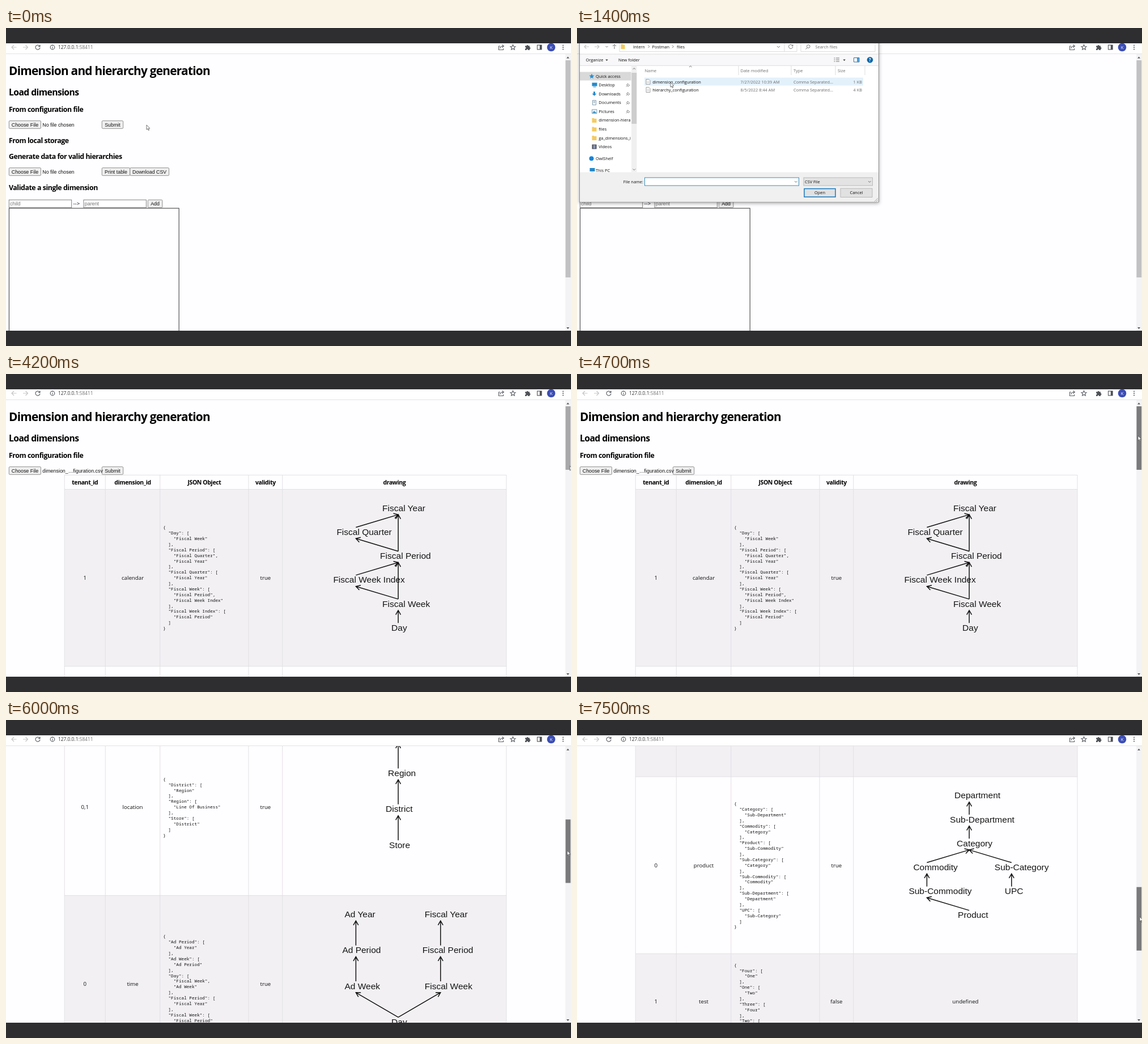
Animation of 997x561 px, one loop 7600 ms. Source, as an HTML page:

```html
<!DOCTYPE html>
<html lang="en">
<head>
<meta charset="utf-8">
<title>Dimension and hierarchy generation</title>
<style>
html, body { margin: 0; width: 100%; height: 100%; overflow: hidden; background: #fefdff; }
svg { display: block; width: 997px; height: 561px; }
text { font-family: "Open Sans", "Noto Sans", sans-serif; fill: #111; }
.h { font-weight: 700; letter-spacing: -.037em; fill: #000; }
.h1 { font-size: 20.9px; }
.h2 { font-size: 15.7px; }
.h3 { font-size: 12.4px; }
.th { font-size: 10.5px; }
.b { font: 8.89px "Liberation Sans", Arial, sans-serif; }
.hint { fill: #757575; }
.td { font-size: 9.7px; }
.m { font: 7.68px "Noto Sans Mono", "DejaVu Sans Mono", monospace; }
.n { font: 15.5px "Liberation Sans", Arial, sans-serif; fill: #151515; }
.d { font-size: 7.4px; }
.dim { fill: #6d6d6d; }
.mid { text-anchor: middle; }
.end { text-anchor: end; }
.btn { fill: #efefef; stroke: #767676; stroke-width: .8; }
.field { fill: #fff; stroke: #767676; stroke-width: .9; }
.ln { fill: none; stroke: #5f6368; stroke-width: 1.2; }
.pale { stroke: #c4c5c8; }
.edge { fill: none; stroke: #111; stroke-width: 1.5; }
.grid { fill: none; stroke: #dfdee1; stroke-width: .9; }
.thin { fill: none; stroke: #666; stroke-width: .9; }
</style>
</head>
<body>
<svg viewBox="0 0 997 561">
  <defs>
    <clipPath id="view"><rect y="46" width="987" height="488"/></clipPath>
    <clipPath id="stage"><rect y="27" width="997" height="507"/></clipPath>
    <clipPath id="nav"><rect x="5" y="66" width="90.5" height="188.5"/></clipPath>
    <filter id="shade" x="-5%" y="-5%" width="110%" height="112%">
      <feDropShadow dx="0" dy="2" stdDeviation="3" flood-opacity=".35"/>
    </filter>
  </defs>
  <rect width="997" height="561" fill="#fefdff"/>

  <g clip-path="url(#view)"><g id="page">
    <text class="h h1" x="5" y="82.8">Dimension and hierarchy generation</text>
    <text class="h h2" x="5" y="118.6">Load dimensions</text>
    <text class="h h3" x="5" y="148.3">From configuration file</text>
    <g id="pick"></g>
    <g id="send"></g>
    <text class="b" id="file" x="64.3" y="173.7"></text>
    <g id="below"></g>
    <g id="table"></g>
    <path id="spin" d="M-.3-6.8A6.8 6.8 0 0 1-2 6.5" fill="none" stroke="#111" stroke-width="1.9"/>
  </g></g>

  <rect x="987" y="46" width="10" height="488" fill="#f3f2f4"/>
  <rect id="thumb" x="987.4" width="8.8"/>
  <path d="M989 53.5l2.5-3 2.5 3zM989 528l2.5 3 2.5-3z" fill="#555"/>

  <g id="bar">
    <rect y="27" width="997" height="18.5" fill="#fff"/>
    <path d="M0 45.5H997" stroke="#e2e1e4"/>
    <path class="ln pale" d="M18.5 34H10M14 30l-4 4 4 4M30 34h8.5M34.5 30l4 4-4 4"/>
    <path class="ln" d="M59.2 31.6A4 4 0 1 0 60 34.6M60 29.6v3h-3"/>
    <circle class="ln" cx="82" cy="34" r="3.8" stroke-width="1"/>
    <path class="ln" d="M82 33.4v2.8M82 31.6v1"/>
    <text x="92" y="37.2" font-size="8.4" style="fill:#333">127.0.0.1<tspan fill="#777">:58411</tspan></text>
    <path class="ln" d="M872 32h-2.5v6.5h8V36M872 36c0-3 2-4 5-4M875.5 29.5l2.8 2.5-2.8 2.5"/>
    <path class="ln" d="M894.5 29.5l1.3 3 3.2.3-2.4 2.1.7 3.2-2.8-1.7-2.8 1.7.7-3.2-2.4-2.1 3.2-.3z"/>
    <path fill="#4d5156" d="M916 31.5h2.6a1.5 1.5 0 1 1 3 0h2.4v2.4a1.5 1.5 0 1 1 0 3v2h-2.6a1.4 1.4 0 0 0-2.8 0H916v-2.4a1.5 1.5 0 0 0 0-3z"/>
    <path class="ln" d="M937.5 30.2h7.5v7.6h-7.5z"/>
    <path fill="#4d5156" d="M941.8 30h3.5v8h-3.5z"/>
    <circle cx="962" cy="34" r="7.3" fill="#3c4db3"/>
    <text class="mid" x="962" y="36.8" font-size="7.6" style="fill:#fff">K</text>
    <g fill="#4d5156"><circle cx="983" cy="30.6" r="1"/><circle cx="983" cy="34" r="1"/><circle cx="983" cy="37.4" r="1"/></g>
  </g>

  <g clip-path="url(#stage)"><g id="dialog">
    <rect x="4.5" y="10" width="528" height="297" fill="#fff" stroke="#777" stroke-width=".8" filter="url(#shade)"/>
    <rect x="5" y="46" width="527" height="20" fill="#f8f8fa"/>
    <path class="thin" style="stroke:#d9d9d9" d="M75 27v14.5h291V27M366 41.5h22V27M395 27v14.5h131V27M5 46h527M5 66.3h527M285 67v16M378 67v16M456 67v16M508 67v16"/>
    <path class="ln pale" d="M21 33h-8M16.5 29.5L13 33l3.5 3.5M31 33h8M35.5 29.5L39 33l-3.5 3.5"/>
    <path class="thin" d="M50.5 32l2 2 2-2M66 37v-8M63 32l3-3 3 3M125.5 30.5l2.3 2.3-2.3 2.3M168 30.5l2.3 2.3-2.3 2.3M353 32l2.5 2.5L358 32M380 30.5a3.6 3.6 0 1 0 .8 2.5M381 29v2.5h-2.5M406 35l-2.5 2.5M198 69l2.3-2 2.3 2"/>
    <circle class="thin" cx="408.3" cy="32.5" r="2.8"/>
    <path d="M77.5 28.5h3l1 1h3V37h-7z" fill="#f5cb60"/>
    <g id="labels"></g>
    <path d="M50.3 55.5h4.4L52.5 58zM469.5 55.5h4.4l-2.2 2.5z" fill="#333"/>
    <path class="thin" d="M453.5 53h2M457 53h6M453.5 56h2M457 56h6M453.5 59h2M457 59h6"/>
    <path d="M488.5 52.5h9.5V60h-9.5z" fill="#fff" stroke="#3c6f94"/>
    <path d="M494 53h4v7h-4z" fill="#4b9cd3"/>
    <circle cx="517" cy="56.3" r="5.3" fill="#0d67a8"/>
    <text class="mid" x="517" y="59.2" font-size="8" font-weight="700" style="fill:#fff">?</text>

    <rect x="5" y="77.5" width="90.5" height="15" fill="#d9d9d9"/>
    <g id="tree" clip-path="url(#nav)"></g>
    <rect x="96" y="66.5" width="9.5" height="188" fill="#f0f0f0"/>
    <rect x="96.3" y="79" width="8.9" height="90" fill="#cdcdcd"/>
    <path class="thin" d="M98.5 73l2.3-2.3 2.3 2.3M98.5 248.5l2.3 2.3 2.3-2.3"/>

    <rect id="hot" x="119" y="87.5" width="386" height="14" fill="#e3f1fb"/>
    <g id="files"></g>

    <rect x="5" y="254.5" width="527" height="52" fill="#f0f0f0"/>
    <rect x="119.5" y="264" width="272" height="14" fill="#fff" stroke="#3c8fb8"/>
    <rect x="400" y="264" width="121.5" height="14" fill="#e3e3e3" stroke="#adadad" stroke-width=".8"/>
    <path class="thin" d="M384 270l2.3 2.3 2.3-2.3M514 270l2.3 2.3 2.3-2.3"/>
    <rect x="401" y="283.5" width="55" height="14.5" fill="#e1e1e1" stroke="#1578be" stroke-width="1.5"/>
    <rect x="465" y="283" width="56" height="15.5" fill="#e1e1e1" stroke="#adadad" stroke-width=".8"/>
    <path d="M531 300l-6 6M531 303l-3 3" stroke="#aaa"/>
    <g id="foot"></g>
  </g></g>

  <path id="mouse" d="M0 0V8.3L2 6.6 3.3 9.7 4.6 9.1 3.3 6.1H5.9Z" fill="#fff" stroke="#555" stroke-width=".8"/>
  <path d="M0 0H997V27H0zM0 534H997V561H0z" fill="#2e2d30"/>
</svg>
<script>
(() => {
const $ = id => document.getElementById(id);
const add = (id, html) => $(id).insertAdjacentHTML('beforeend', html);
const text = (x, y, s, cls) => `<text class="${cls}" x="${x}" y="${y}">${s}</text>`;
const box = (x, y, w, cls, r = 0) =>
  `<rect class="${cls}" x="${x}" y="${y}" width="${w}" height="13.6" rx="${r}"/>`;
const button = (x, y, w, s) => box(x, y, w, 'btn', 1.5) + text(x + w / 2, y + 10, s, 'b mid');
const input = (x, y, w, s) => box(x, y, w, 'field') + text(x + 1.8, y + 10, s, 'b hint');

// Form
add('pick', button(5.3, 163.7, 56.2, 'Choose File'));
add('send', button(169.3, 163.7, 37.4, 'Submit'));
add('below',
  text(5, 203.2, 'From local storage', 'h h3') +
  text(5, 231.2, 'Generate data for valid hierarchies', 'h h3') +
  button(5.3, 246.7, 56.2, 'Choose File') + text(64.3, 256.7, 'No file chosen', 'b') +
  button(169.3, 246.7, 49.5, 'Print table') + button(218.8, 246.7, 68.8, 'Download CSV') +
  text(5, 286, 'Validate a single dimension', 'h h3') +
  input(5.3, 303.2, 110.4, 'child') + text(118.5, 313.2, '--&gt;', 'td') +
  input(137, 303.2, 110.4, 'parent') + button(250.3, 303.2, 25.6, 'Add') +
  '<rect x="5.4" y="318" width="299.8" height="300" fill="none" stroke="#333"/>');

// Result table: links map each child to its parents, spots give column and level
const rows = [
  { tenant: '1', name: 'calendar', valid: true, levels: 6,
    links: { 'Day': ['Fiscal Week'], 'Fiscal Period': ['Fiscal Quarter', 'Fiscal Year'],
      'Fiscal Quarter': ['Fiscal Year'], 'Fiscal Week': ['Fiscal Period', 'Fiscal Week Index'],
      'Fiscal Week Index': ['Fiscal Period'] },
    spots: { 'Fiscal Year': [1, 0], 'Fiscal Quarter': [0, 1], 'Fiscal Period': [1, 2],
      'Fiscal Week Index': [0, 3], 'Fiscal Week': [1, 4], 'Day': [1, 5] } },
  { tenant: '0,1', name: 'location', valid: true, levels: 4,
    links: { 'District': ['Region'], 'Region': ['Line Of Business'], 'Store': ['District'] },
    spots: { 'Line Of Business': [1, 0], 'Region': [1, 1], 'District': [1, 2], 'Store': [1, 3] } },
  { tenant: '0', name: 'time', valid: true, levels: 4,
    links: { 'Ad Period': ['Ad Year'], 'Ad Week': ['Ad Period'], 'Day': ['Fiscal Week', 'Ad Week'],
      'Fiscal Period': ['Fiscal Year'], 'Fiscal Week': ['Fiscal Period'] },
    spots: { 'Ad Year': [0, 0], 'Fiscal Year': [2, 0], 'Ad Period': [0, 1], 'Fiscal Period': [2, 1],
      'Ad Week': [0, 2], 'Fiscal Week': [2, 2], 'Day': [1, 3] } },
  { tenant: '0', name: 'product', valid: true, levels: 6,
    links: { 'Category': ['Sub-Department'], 'Commodity': ['Category'], 'Product': ['Sub-Commodity'],
      'Sub-Category': ['Category'], 'Sub-Commodity': ['Commodity'],
      'Sub-Department': ['Department'], 'UPC': ['Sub-Category'] },
    spots: { 'Department': [1, 0], 'Sub-Department': [1, 1], 'Category': [1, 2], 'Commodity': [0, 3],
      'Sub-Category': [2, 3], 'Sub-Commodity': [0, 4], 'UPC': [2, 4], 'Product': [1, 5] } },
  { tenant: '1', name: 'test', valid: false, height: 168,
    links: { Four: ['One'], One: ['Two'], Three: ['Four'], Two: ['Three'] } }
];

function arrow([x1, y1], [x2, y2]) {
  y1 -= 8;
  y2 += 11.8;
  const a = Math.atan2(y1 - y2, x1 - x2);
  const barb = s => `${x2 + 8.8 * Math.cos(a + s)} ${y2 + 8.8 * Math.sin(a + s)}`;
  return `<path class="edge" d="M${x1} ${y1}L${x2} ${y2}M${barb(.52)}L${x2} ${y2}L${barb(-.52)}"/>`;
}

function graph({ levels, links, spots }, y0) {
  const at = s => [617.4 + 74.7 * spots[s][0], y0 + 32.8 + spots[s][1] * 253.2 / levels];
  const names = Object.keys(spots).map(s => {
    const [x, y] = at(s);
    return text(x - 6 - 2 * s.length, y + 5.5, s, 'n');
  });
  const edges = Object.entries(links).flatMap(([kid, ups]) => ups.map(up => arrow(at(kid), at(up))));
  return names.join('') + edges.join('');
}

function json(links, mid) {
  const lines = JSON.stringify(links, null, 2).split('\n');
  const first = mid - (lines.length - 1) * 9.88 / 2 + 2.6;
  return lines.map((s, i) => {
    const t = s.trimStart();
    return text(277.3 + (s.length - t.length) * 4.61, first + i * 9.88, t, 'm');
  }).join('');
}

const cols = [103.2, 175.3, 271.8, 428, 487.8, 883];
const centre = i => (cols[i] + cols[i + 1]) / 2;
let rowY = 203.5, html = '<path class="grid" d="M103 178.3H883"/>';
['tenant_id', 'dimension_id', 'JSON Object', 'validity', 'drawing']
  .forEach((s, i) => html += text(centre(i), 195.2, s, 'h th mid'));
rows.forEach((r, i) => {
  const h = r.height || 312.2, mid = rowY + h / 2;
  const cell = (col, s) => text(centre(col), mid + 3.6, s, 'td mid');
  html += `<rect x="103.2" y="${rowY}" width="779.8" height="${h}" fill="${i % 2 ? '#fefdff' : '#f2f0f3'}"/>` +
    `<path class="grid" d="M103 ${rowY}H883"/>` +
    cell(0, r.tenant) + cell(1, r.name) + json(r.links, mid) + cell(3, r.valid) +
    (r.spots ? graph(r, rowY) : cell(4, 'undefined'));
  rowY += h;
});
html += `<path class="grid" d="${cols.map(x => `M${x} 178V${rowY}`).join('')}"/>`;
add('table', html);

// File dialog
const put = (id, list) => add(id, list.map(([x, y, s, c = '']) => text(x, y + 2.6, s, 'd ' + c)).join(''));
put('labels', [[99, 33, 'Intern'], [132.5, 33, 'Postman'], [176, 33, 'files'], [420.5, 33, 'Search files', 'dim'],
  [15.5, 56.5, 'Organize'], [73, 56.5, 'New folder'], [119.5, 75.3, 'Name', 'dim'],
  [288.5, 75.3, 'Date modified', 'dim'], [382, 75.3, 'Type', 'dim'], [460, 75.3, 'Size', 'dim']]);
[['dimension_configuration', '7/27/2022 10:39 AM', '1 KB'], ['hierarchy_configuration', '8/5/2022 8:44 AM', '4 KB']]
  .forEach(([name, date, size], i) => {
    const y = 95 + 14.2 * i;
    add('files', `<path d="M122 ${y - 4.5}h5l2 2v6.8h-7z" fill="#fff" stroke="#8a8a8a" stroke-width=".8"/>` +
      `<path d="M123.5 ${y - 1}h4M123.5 ${y + 1.5}h4" stroke="#aaa" stroke-width=".7"/>`);
    put('files', [[133.3, y, name], [288.5, y, date, 'dim'], [382, y, 'Comma Separated...', 'dim'], [503, y, size, 'dim end']]);
  });
put('foot', [[117, 271, 'File name:', 'end'], [402, 271, 'CSV File'], [428.5, 290.8, 'Open', 'mid'], [493, 290.8, 'Cancel', 'mid']]);

const folder = (x, y) => `<path d="M${x} ${y - 4}h3l1 1h4v7h-8z" fill="#f5cb60"/>`;
const monitor = (x, y) => `<path d="M${x} ${y - 4}h9v6h-9zM${x + 2} ${y + 3}h5v1h-5z" fill="#2589c9"/>`;
const pin = y => `<path class="thin" d="M87 ${y + 3}l2-2m-1.5-1.5l3 3m-1-5l3.3 3.3m-3.3-3.3l-1.5 2.3m4.5 1l-2 1.5"/>`;
const icons = {
  'Desktop': y => monitor(26.5, y) + pin(y),
  'Downloads': y => `<path d="M29 ${y - 4}h3v3.5h2.5l-4 4-4-4H29z" fill="#2589c9"/>` + pin(y),
  'Documents': y => `<path d="M27.5 ${y - 4}h6v8h-6zM29 ${y - 2}h3M29 ${y}h3" fill="#fff" stroke="#5c7f99" stroke-width=".8"/>` + pin(y),
  'Pictures': y => `<path d="M26.5 ${y - 3.5}h8.5v7h-8.5z" fill="#e8f3fa" stroke="#6d8ea5" stroke-width=".8"/>` +
    `<path d="M27 ${y + 3}l3-4 5 4z" fill="#3b93c9"/>` + pin(y),
  'Videos': y => `<path d="M26.5 ${y - 4}h8v8h-8z" fill="#4a4e5c"/><path d="M28.5 ${y - 3}h4v6h-4z" fill="#8b97b5"/>`
};
['Desktop', 'Downloads', 'Documents', 'Pictures', 'dimension-hiera', 'files', 'ga_dimensions_i', 'Videos'].forEach((s, i) => {
  const y = 100.6 + 15.57 * i;
  add('tree', icons[s] ? icons[s](y) : folder(26.5, y));
  put('tree', [[38.3, y, s]]);
});
add('tree', '<path d="M26 80.5l1.3 3 3.2.3-2.4 2.2.7 3.2-2.8-1.7-2.8 1.7.7-3.2-2.4-2.2 3.2-.3z" fill="#2b8fd0"/>' +
  '<circle cx="25.5" cy="230.3" r="4" fill="#1683d8"/>' + monitor(22.5, 251));
put('tree', [[33, 85, 'Quick access'], [33, 230.3, 'OwlShelf'], [33, 251, 'This PC']]);

// Timeline: [time, ...values], straight between stops
const mousePath = [[0, 248, 171], [100, 248, 171], [500, 40, 168], [1000, 40, 168], [1300, 165, 96], [1600, 165, 96],
  [2000, 187, 168], [2200, 187, 168], [2400, 176, 144], [3700, 176, 144], [4200, 995, 162], [4600, 990, 109],
  [4700, 990, 109], [5400, 990, 204], [5800, 990, 204], [6600, 991, 310], [6900, 993, 347], [7600, 993, 347]];
const scrollPath = [[0, 0], [4700, 0], [5400, 417], [5800, 417], [6600, 822], [6900, 1040], [7600, 1040]];

function sample(track, t) {
  const i = track.findIndex(k => k[0] > t);
  const a = track[i - 1], b = track[i], f = (t - a[0]) / (b[0] - a[0]);
  return a.slice(1).map((v, j) => v + (b[j + 1] - v) * f);
}

const show = (id, on) => $(id).style.display = on ? '' : 'none';
const move = (id, x, y, more = '') => $(id).setAttribute('transform', `translate(${x} ${y})${more}`);

function draw() {
  const t = Math.floor(performance.now() % 7600 / 100) * 100;
  const loading = t >= 2200 && t < 2800, loaded = t >= 2800;
  const [x, y] = sample(mousePath, t), [s] = sample(scrollPath, t);
  const held = t >= 4600 && t < 5500 || t >= 5800;

  move('page', 0, -s);
  move('mouse', x, y);
  move('send', 0, loading ? 1 : 0);
  move('below', 0, loading ? 2 : 0);
  move('spin', 229, 172, ` rotate(${(t - 2400) * .36})`);
  show('spin', loading);
  show('below', !loaded);
  show('table', loaded);
  show('dialog', t >= 900 && t < 1600);
  show('hot', t >= 1300);
  $('file').textContent = t < 1600 ? 'No file chosen' : 'dimension_…figuration.csv';

  const thumb = $('thumb');
  thumb.setAttribute('y', 57 + s / 4.375);
  thumb.setAttribute('height', loaded ? 112 : loading ? 382 : 383);
  thumb.setAttribute('fill', held ? '#7a797c' : t >= 4200 ? '#a8a7aa' : '#c1c0c3');
  requestAnimationFrame(draw);
}
draw();
})();
</script>
</body>
</html>
```
